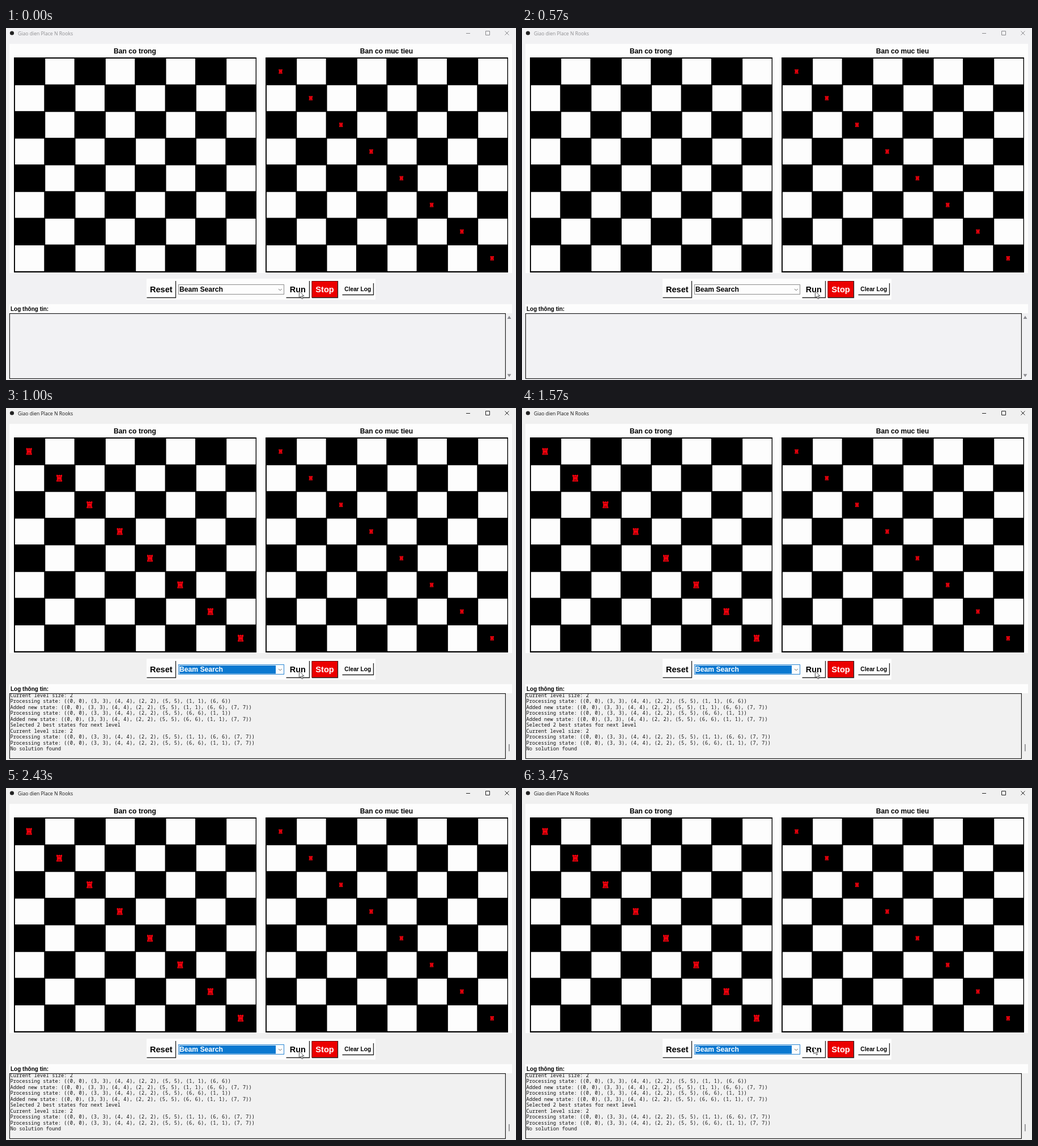
These frames come from a looping animation (900x622 px, 3510 ms). An HTML page:

```html
<!DOCTYPE html>
<html lang="vi">
<head>
<meta charset="utf-8">
<title>Place N Rooks</title>
<style>
html, body { margin: 0; width: 100%; height: 100%; overflow: hidden; background: #f1f1f2; }
svg { display: block; width: 900px; height: 622px; }
text { white-space: pre; }
.bold { font-family: "Liberation Sans", Arial, sans-serif; font-weight: 700; }
.ui { font-family: "Open Sans", sans-serif; }
.mono { font-family: "Noto Sans Mono", monospace; }
</style>
</head>
<body>
<svg id="stage" viewBox="0 0 900 622"></svg>
<script>
const LOOP = 3510, SOLVED = 790, MOVE = 3380, MOVE_END = 3470;
const stage = document.getElementById('stage');

function add(tag, attrs, parent = stage, content) {
  const el = document.createElementNS('http://www.w3.org/2000/svg', tag);
  for (const k in attrs) el.setAttribute(k, attrs[k]);
  if (content) el.textContent = content;
  return parent.appendChild(el);
}
const rect = (x, y, width, height, fill, parent) => add('rect', { x, y, width, height, fill }, parent);
const path = (d, attrs, parent) => add('path', { d, fill: 'none', ...attrs }, parent);
const text = (str, x, y, size, attrs, parent) =>
  add('text', { x, y, 'font-size': size, class: 'bold', ...attrs }, parent, str);

function rook(cx, cy, scale, parent) {
  const g = add('g', { transform: `translate(${cx} ${cy}) scale(${scale})` }, parent);
  path('M-5-6H-2.5V-5H-1V-6H1V-5H2.5V-6H5V-3L4.2-2V2.7L5 4V6H-5V4L-4.2 2.7V-2L-5-3Z', { fill: '#f2000c' }, g);
  path('M-3-2.6H3M-2.2 2.6H2.2M-3.4 4.4H3.4', { stroke: '#4a0004', 'stroke-width': 0.7 }, g);
}

const STEP_X = 53.33, STEP_Y = 47.15;
function board(x) {
  rect(x, 52, 428, 380, '#000');
  for (let r = 0; r < 8; r++)
    for (let c = 0; c < 8; c++)
      if ((r + c) % 2)
        rect(x + 1.9 + c * STEP_X, 54 + r * STEP_Y, 51.4, 45.7, '#fdfdfd');
}
function rooks(x, scale, parent) {
  for (let i = 0; i < 8; i++) rook(x + i * STEP_X, 76.8 + i * STEP_Y, scale, parent);
}

function button(label, x, y, w, h, size, fill = '#fdfdfd', color = '#000') {
  rect(x, y, w, h, fill);
  path(`M${x + 0.5} ${y + h - 0.5}H${x + w - 0.5}V${y}`, { stroke: '#222', 'stroke-width': 1.3 });
  text(label, x + w / 2 - 0.2, y + h / 2 + size * 0.36, size, { 'text-anchor': 'middle', fill: color });
}

// window and panels
const back = rect(0, 0, 900, 622);
rect(6, 28, 887, 405, '#fdfdfd');
rect(248, 443, 404, 37, '#fdfdfd');
rect(6, 488, 887, 16, '#fdfdfd');

add('circle', { cx: 10.5, cy: 9, r: 3.6, fill: '#222' });
const caption = text('Giao dien Place N Rooks', 21, 12.8, 8.65, { class: 'ui' });
const controls = path('M812 9.5H819M846.5 5.5H853.5V12.5H846.5ZM880.5 5.5L887.5 12.5M887.5 5.5L880.5 12.5', {});

text('Ban co trong', 227.5, 44.7, 12.15, { 'text-anchor': 'middle' });
text('Ban co muc tieu', 671.5, 44.7, 12.1, { 'text-anchor': 'middle' });
board(14);
board(458);
rooks(484.5, 0.65, stage);

// toolbar
button('Reset', 248, 447, 52, 30, 14.6);
const combo = add('rect', { x: 304.5, y: 453.5, width: 186, height: 17, fill: '#fdfdfd' });
const selection = rect(306, 455, 170, 14.5, '#0a78d0');
const choice = text('Beam Search', 306, 466.3, 12.15);
path('M481 461L483.8 463.8L486.6 461', { stroke: '#555', 'stroke-width': 0.9 });
button('Run', 494, 447, 42, 30, 14.4);
button('Stop', 539.5, 447, 46.5, 30, 14.6, '#ec0000', '#fff');
path('M540 476V447.5H586', { stroke: '#5a0000', 'stroke-width': 0.8 });
button('Clear Log', 593, 451, 56, 21, 10.2);

// log
text('Log thông tin:', 8, 500, 10);
const box = add('rect', { x: 6.4, y: 504.6, width: 875, height: 114.9, stroke: '#101010', 'stroke-width': 1.1 });
const arrows = path('M884.6 514L888 508.6L891.4 514ZM884.6 611.4L888 616.8L891.4 611.4Z', { fill: '#8b8b90' });

const result = add('g', {});
rooks(40.7, 1, result);
add('rect', { x: 7, y: 505, width: 874, height: 114 }, add('clipPath', { id: 'logbox' }));
const log = add('g', { 'clip-path': 'url(#logbox)' }, result);
const state = ds => '((' + [...ds].map(d => `${d}, ${d}`).join('), (') + '))';
[
  'Current level size: 2',
  'Processing state: ' + state('0342516'),
  'Added new state: ' + state('03425167'),
  'Processing state: ' + state('0342561'),
  'Added new state: ' + state('03425617'),
  'Selected 2 best states for next level',
  'Current level size: 2',
  'Processing state: ' + state('03425167'),
  'Processing state: ' + state('03425617'),
  'No solution found'
].forEach((line, i) => text(line, 7.5, 510.8 + i * 10.5, 8.78, { class: 'mono', fill: '#111' }, log));
rect(887.2, 594, 1.4, 12.5, '#77777b', result);

const cursor = path('M0 0V12L2.8 9.4L4.7 13.8L6.6 13L4.7 8.7H8.4Z', { fill: '#fff', stroke: '#222', 'stroke-width': 0.8 });

function draw(t) {
  const solved = t >= SOLVED;
  const show = on => on ? 'visible' : 'hidden';
  result.setAttribute('visibility', show(solved));
  selection.setAttribute('visibility', show(solved));
  arrows.setAttribute('visibility', show(!solved));
  back.setAttribute('fill', solved ? '#f0f0f0' : '#f1f1f3');
  box.setAttribute('fill', solved ? '#f1f1f1' : '#f2f2f4');
  caption.setAttribute('fill', solved ? '#151515' : '#8d8d90');
  controls.setAttribute('stroke', solved ? '#222' : '#88888b');
  combo.setAttribute('stroke', solved ? '#2a86d2' : '#8c8c8c');
  choice.setAttribute('fill', solved ? '#fff' : '#000');
  const p = Math.min(1, Math.max(0, (t - MOVE) / (MOVE_END - MOVE)));
  cursor.setAttribute('transform', `translate(${517.4 - 2.5 * p} ${464.8 - 7 * p})`);
}

const start = performance.now();
function tick() {
  draw((performance.now() - start) % LOOP);
  requestAnimationFrame(tick);
}
tick();
</script>
</body>
</html>
```
